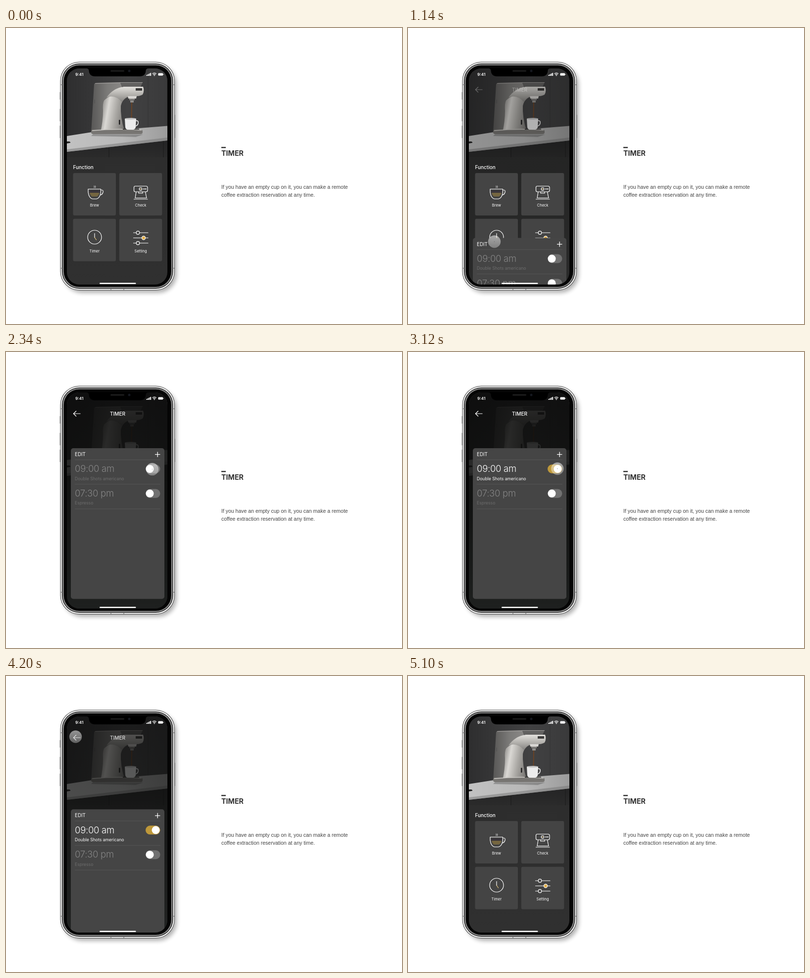
These frames come from a looping animation (800 by 600 pixels, 5520 ms). An HTML page:

```html
<!DOCTYPE html>
<html lang="en">
<head>
<meta charset="utf-8">
<title>Timer</title>
<style>
  html, body { margin: 0; width: 100%; height: 100%; overflow: hidden; background: #fff; }
  svg { display: block; width: 800px; height: 600px; font-family: Inter, Roboto, sans-serif; }
  .copy { font-family: "Liberation Sans", Arial, sans-serif; font-size: 10.5px; fill: #444; }
  .label { font-size: 7.5px; fill: #fff; text-anchor: middle; }
  .time { font-size: 18.5px; font-weight: 300; letter-spacing: -.3px; }
  .note { font-size: 8.6px; }
  .icon { fill: none; stroke: #fff; stroke-width: 1.2; stroke-linecap: round; stroke-linejoin: round; }
</style>
</head>
<body>
<svg viewBox="0 0 800 600">
  <defs>
    <clipPath id="screen"><rect x="123" y="82" width="203" height="438" rx="25"/></clipPath>
    <filter id="blur" x="-20%" y="-20%" width="140%" height="140%"><feGaussianBlur stdDeviation="4"/></filter>
    <linearGradient id="wall"><stop stop-color="#2e2e2f"/><stop offset=".6" stop-color="#414142"/><stop offset="1" stop-color="#3a3a3b"/></linearGradient>
    <linearGradient id="floor" x2="0" y2="1"><stop stop-color="#2b2b2b"/><stop offset="1" stop-color="#303030"/></linearGradient>
    <linearGradient id="cabinet" x2="0" y2="1"><stop stop-color="#232324"/><stop offset="1" stop-color="#2b2b2b"/></linearGradient>
    <linearGradient id="counter"><stop stop-color="#c2c2c2"/><stop offset=".55" stop-color="#b8b8b8"/><stop offset="1" stop-color="#9c9c9c"/></linearGradient>
    <linearGradient id="tank"><stop stop-color="#585756"/><stop offset=".5" stop-color="#7b7a78"/><stop offset="1" stop-color="#8c8a88"/></linearGradient>
    <linearGradient id="neck" gradientUnits="userSpaceOnUse" x1="192" y1="185" x2="238" y2="193"><stop stop-color="#a3a19e"/><stop offset=".22" stop-color="#dad8d4"/><stop offset=".6" stop-color="#a9a7a3"/><stop offset="1" stop-color="#7b7976"/></linearGradient>
    <linearGradient id="arm" x2="0" y2="1"><stop stop-color="#e2e0dc"/><stop offset=".35" stop-color="#c2c0bc"/><stop offset="1" stop-color="#84827f"/></linearGradient>
    <linearGradient id="dim" x2="0" y2="1"><stop stop-color="#0a0a0a" stop-opacity=".88"/><stop offset=".5" stop-color="#0c0d0c" stop-opacity=".82"/><stop offset="1" stop-color="#0c100e" stop-opacity=".5"/></linearGradient>
    <linearGradient id="touch" x2="0" y2="1"><stop stop-color="#fff" stop-opacity=".54"/><stop offset="1" stop-color="#fff" stop-opacity=".32"/></linearGradient>
  </defs>

  <rect width="800" height="600" fill="#fff"/>

  <rect x="435" y="241" width="9" height="2.4" fill="#333"/>
  <text x="435" y="259" font-size="14.3" font-weight="700" fill="#333">TIMER</text>
  <text class="copy" x="435" y="326">If you have an empty cup on it, you can make a remote</text>
  <text class="copy" x="435" y="342">coffee extraction reservation at any time.</text>

  <!-- phone body -->
  <rect x="116" y="76" width="229" height="461" rx="38" fill="#000" opacity=".3" filter="url(#blur)"/>
  <path d="M109.300 130v15M109.300 164v25M109.300 198v25M341 176v47" stroke="#777" stroke-width="1.200"/>
  <g id="shell"></g>
  <path d="M110.500 115h3M110.500 487h3M337 115h3M337 487h3M212 531v-3M238 531v-3" stroke="#888" stroke-width="1.500"/>

  <g clip-path="url(#screen)">
    <rect x="123" y="82" width="203" height="438" fill="url(#floor)"/>

    <!-- kitchen scene -->
    <rect x="123" y="82" width="203" height="150" fill="url(#wall)"/>
    <path d="M287 82V204M325 82V200" stroke="#333" stroke-width=".8"/>
    <path d="M123 246L326 224V262H123z" fill="url(#cabinet)"/>
    <path d="M208 240v22M318 229v33" stroke="#1a1a1a" stroke-width="1"/>
    <path d="M123 219L180 210L326 198.500V228L123 251z" fill="url(#counter)"/>
    <path d="M123 246L326 222V228L123 251z" fill="#777" opacity=".5"/>
    <path d="M123 230l5 0q4 2 1 3l-6 1z" fill="#222"/>
    <path d="M176 215L277 216L262 221L172 219z" fill="#444" opacity=".35"/>
    <path d="M178 114Q179 111 184 111L231 110L238 130L205 212H172z" fill="url(#tank)"/>
    <path d="M230 110H276L272 119H235z" fill="#626160"/>
    <path d="M180 112.500L231 111M230 110.500H276" stroke="#aaa8a5" stroke-width=".9"/>
    <path d="M198 147Q212 133 242 130L252 138Q235 142 232 158Q231 180 239 208L191 211Q196 188 196 168Q195 154 198 147z" fill="url(#neck)"/>
    <path d="M203 141Q216 122 238 119H277Q280 128 276 135Q268 140 249 138Q238 141 234 150Q220 134 203 141z" fill="url(#arm)"/>
    <path d="M262 122h13v5h-13z" fill="#3d3c3b"/>
    <path d="M179 145v8" stroke="#555" stroke-width="1.500"/>
    <rect x="228" y="186" width="2.600" height="10" rx="1.300" fill="#222"/>
    <path d="M246 138h18l-1 5h-16z" fill="#d7d5d2"/>
    <path d="M249 143h11v3l-2 1v4h-7v-4l-2-1z" fill="#8f8d8a"/>
    <path d="M250 146h9" stroke="#444" stroke-width="1"/>
    <path d="M254 151L253.500 182" stroke="#6d4324" stroke-width="1.800"/>
    <rect x="172" y="206" width="104" height="9" rx="4" fill="#777572"/>
    <path d="M174 208Q225 203 274 207" fill="none" stroke="#cbc9c5" stroke-width="1.500"/>
    <path d="M236 205h33" stroke="#3f3e3c" stroke-width="2"/>
    <path d="M262 188q6-1 5 5q-1 5-6 6" fill="none" stroke="#e0e0e0" stroke-width="1.800"/>
    <path d="M240 184H263L262 201Q261 206 256 206H246Q242 206 241 201z" fill="#ececec"/>
    <ellipse cx="251.500" cy="184" rx="11.500" ry="1.800" fill="#c8c8c8"/>
    <rect id="shade" x="123" y="82" width="203" height="438" fill="url(#dim)"/>

    <!-- function menu -->
    <g id="menu">
      <text x="135.500" y="285.700" font-size="10" font-weight="500" fill="#fff">Function</text>
      <g id="tiles"></g>
      <g class="icon">
        <path d="M168.500 329.500H189V334H168.500z" fill="#39343a" stroke="none"/>
        <path d="M169 334H188.500Q187 340 183.500 341.500H174Q170.500 340 169 334z" fill="#756640" stroke="none"/>
        <path d="M166 326.500H191.500V333Q190 345 182.500 346.500H175Q167.500 345 166 333zM191.500 328.500H194Q197 329 196 333Q195 337.500 190.500 338.500"/>
        <path d="M178 324q1-1.500 0-4M180.500 324q1-1.500 0-4" stroke-width=".8"/>
        <path d="M261 320.500H283Q286 320.500 286 323.500V329Q286 332 283 332H261Q258.500 332 258.500 329V323.500Q258.500 320.500 261 320.500zM263 332L261 344.500M281.500 332L284 344.500M258.500 347H286M261 344.500H284M268 332V335H276V332"/>
        <circle cx="272" cy="326.300" r="2.800"/><circle cx="272" cy="326.300" r="1" fill="#d5ae52" stroke="none"/>
        <path d="M278.500 326.300h.5M282 326.300h.5" stroke-width="2.200"/>
        <circle cx="179" cy="424" r="14"/>
        <path d="M179 416.500V424.500"/><path d="M179 424.500L182.500 429.500" stroke="#e2c47d"/>
        <path d="M257.500 415H287M257.500 425.500H287M257.500 436H287"/>
        <g fill="#444"><circle cx="266.500" cy="415" r="3.300"/><circle cx="278" cy="425.500" r="3.600" fill="#e0ac45"/><circle cx="266.500" cy="436" r="3.300"/></g>
      </g>
    </g>

    <!-- timer page -->
    <g id="header" fill="#fff">
      <path d="M150.500 125H136.500M142 119.500L136.300 125L142 130.500" fill="none" stroke="#fff" stroke-width="1.200"/>
      <text x="225.500" y="129" font-size="10.100" font-weight="500" text-anchor="middle">TIMER</text>
    </g>
    <g id="panel">
      <rect x="131" y="195" width="189" height="305.500" rx="5" fill="#454545"/>
      <text x="139" y="211" font-size="9.800" fill="#fff">EDIT</text>
      <path d="M301 207.700H311.400M306.200 202.500V212.900" stroke="#fff" stroke-width="1.300"/>
      <path d="M139 218.500H312M139 268H312M139 318H312" stroke="#575757" stroke-width=".9"/>
      <g id="rows"></g>
    </g>

    <circle id="ball" r="12.500" fill="url(#touch)" stroke="#fff" stroke-opacity=".15" stroke-width=".8"/>
    <circle id="dot" r=".7" fill="#555" opacity=".7"/>
    <rect x="189" y="516.500" width="73.500" height="2.500" rx="1.200" fill="#fff"/>
  </g>

  <!-- notch and status bar -->
  <path d="M160 81.500Q167 81.500 167.500 86Q168 98 180 98H270Q282 98 282.500 86Q283 81.500 290 81.500z" fill="#000"/>
  <rect x="211" y="85.500" width="28" height="3" rx="1.500" fill="#1d1d1d"/>
  <circle cx="249" cy="87" r="2.500" fill="#15181f"/>
  <text x="140" y="97" font-size="8.200" font-weight="600" fill="#fff">9:41</text>
  <g fill="#fff">
    <path d="M283.500 97v-2h1.800v2zM286.100 97v-3.200h1.800v3.200zM288.700 97v-4.700h1.800v4.700zM291.300 97v-6h1.800v6z"/>
    <rect x="307.500" y="91.500" width="9.500" height="5" rx="1.300"/><path d="M317.600 93h.9v2h-.9z"/>
    <path d="M295.700 92.800q4-3.200 8 0M297.200 94.700q2.500-2 5 0" fill="none" stroke="#fff" stroke-width="1.200"/>
    <circle cx="299.700" cy="96.200" r="1"/>
  </g>
</svg>

<script>
const LOOP = 5520;
const $ = id => document.getElementById(id);
const set = (el, attrs) => { for (const k in attrs) el.setAttribute(k, attrs[k]); };
const mix = (a, b, u) => a + (b - a) * u;
const gray = v => `rgb(${v},${v},${v})`;

// sine ease between two moments
function ease(t, from, to) {
  const p = Math.min(1, Math.max(0, (t - from) / (to - from)));
  return (1 - Math.cos(Math.PI * p)) / 2;
}

// nested metal rings, each given as inset and colour
$('shell').innerHTML = [[0, '#4a4a4a'], [1, '#ececec'], [3.5, '#222'], [5, '#8c8c8c'], [7.2, '#050505']].map(([inset, fill]) =>
  `<rect x="${109.5 + inset}" y="${68.5 + inset}" width="${231.5 - 2 * inset}" height="${463.5 - 2 * inset}" rx="${38.5 - inset}" fill="${fill}"/>`
).join('');

$('tiles').innerHTML = ['Brew', 'Check', 'Timer', 'Setting'].map((name, i) => {
  const x = 135.5 + (i % 2) * 93.3, y = 294 + (i >> 1) * 92.8;
  return `<rect x="${x}" y="${y}" width="86.500" height="86" rx="3" fill="#444"/>
    <text class="label" x="${x + 43.3}" y="${y + 67.7}">${name}</text>`;
}).join('');

$('rows').innerHTML = [['09:00 am', 'Double Shots americano'], ['07:30 pm', 'Espresso']].map(([time, note], i) => {
  const y = i * 49.8;
  return `<g transform="translate(0 ${y})">
    <text class="time" x="139" y="243.300" fill="#858585">${time}</text>
    <text class="note" x="139" y="259.500" fill="#6d6d6d">${note}</text>
    <rect x="282" y="228" width="29.500" height="18" rx="9" fill="#717171"/>
    <circle cx="290.500" cy="237" r="8" fill="#fff"/></g>`;
}).join('');
const [time, note, track, knob] = $('rows').firstElementChild.children;

// touch path: start, end, control point, destination
const start = [225, 535];
const moves = [
  [0, 660, [205, 455], [174.5, 433]],
  [1490, 1950, [210, 211], [304, 238]],
  [2080, 2520, [298, 238], [290, 237]],
  [2700, 3150, [296, 237], [302, 236.5]],
  [3280, 3780, [225, 150], [140, 122]],
  [4168, 5100, [232, 288], [228, 535]]
];

function ballAt(t) {
  let pos = start;
  for (const [from, to, ctrl, end] of moves) {
    if (t < from) break;
    const u = ease(t, from, to), v = 1 - u, origin = pos;
    pos = [0, 1].map(i => v * v * origin[i] + 2 * u * v * ctrl[i] + u * u * end[i]);
  }
  return pos;
}

function draw(t) {
  const open = ease(t, 960, 1440) - ease(t, 4050, 4530);
  const on = ease(t, 2700, 3150);
  const [x, y] = ballAt(t);

  set($('shade'), { opacity: open });
  set($('header'), { opacity: open });
  set($('panel'), { transform: `translate(0 ${mix(335, 0, open)})` });
  set($('menu'), { visibility: open > .999 ? 'hidden' : 'visible' });

  set(time, { fill: gray(mix(133, 255, on)) });
  set(note, { fill: gray(mix(109, 255, on)) });
  set(track, { fill: `rgb(${mix(113, 190, on)},${mix(113, 152, on)},${mix(113, 58, on)})` });
  set(knob, { cx: mix(290.5, 302.5, on) });

  set($('ball'), { cx: x, cy: y });
  set($('dot'), { cx: x, cy: y });
}

const began = performance.now();
function tick() {
  draw((performance.now() - began) % LOOP);
  requestAnimationFrame(tick);
}
draw(0);
requestAnimationFrame(tick);
</script>
</body>
</html>
```
